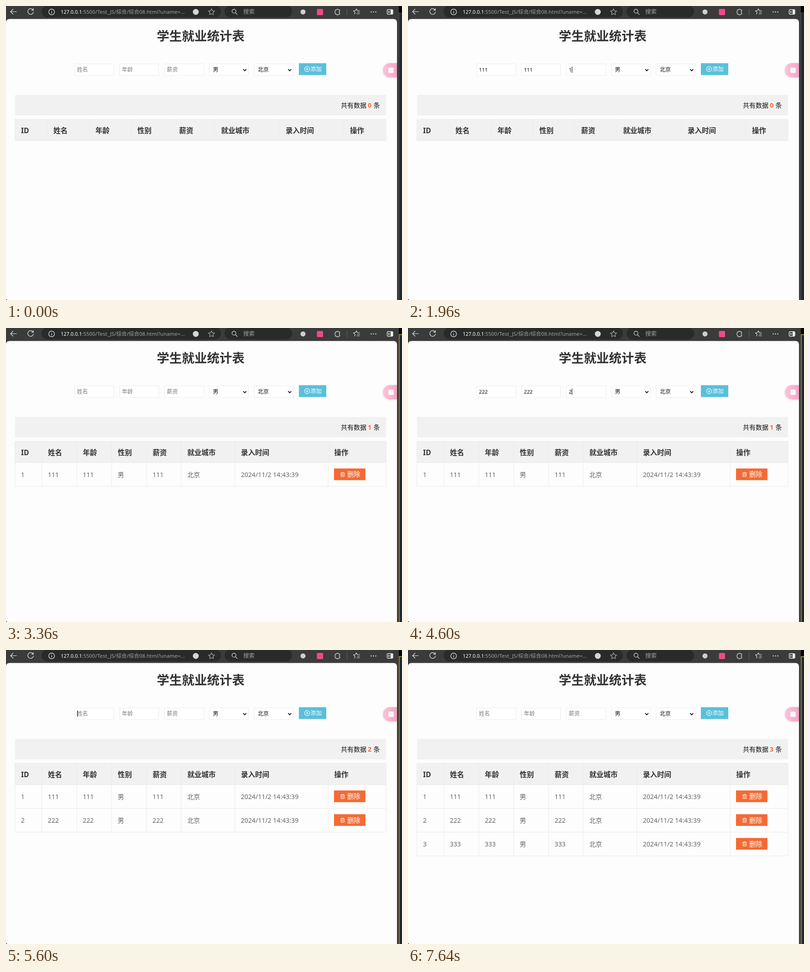
An HTML page that plays this animation: 868x645 px, repeating every 8000 ms.

```html
<!DOCTYPE html>
<html lang="zh-CN">
<head>
<meta charset="utf-8">
<title>学生就业统计表</title>
<style>
  html, body { margin: 0; width: 100%; height: 100%; overflow: hidden; background: #3b3b3b; }
  svg { display: block; width: 868px; height: 645px; }
  text { font-family: 'Noto Sans', 'Noto Sans CJK SC', sans-serif; white-space: pre; }
  .icon { fill: none; stroke: #e6e6e6; stroke-width: 1.2; stroke-linecap: round; stroke-linejoin: round; }
  .tab { filter: drop-shadow(0 1px 2px rgba(0, 0, 0, .14)); }
</style>
</head>
<body>
<svg viewBox="0 0 868 645">
  <defs>
    <linearGradient id="pink" x2="1"><stop stop-color="#fbc3d9"/><stop offset="1" stop-color="#f5a2c6"/></linearGradient>
    <clipPath id="sheet"><path d="M0 0H857V645H0Z"/></clipPath>
  </defs>
  <g id="chrome"></g>
  <g id="page"></g>
</svg>
<script>
const LOOP = 8000;
const FIELDS = [150.5, 249, 347.5];
const HINTS = ['姓名', '年龄', '薪资'];
const HEADS = ['ID', '姓名', '年龄', '性别', '薪资', '就业城市', '录入时间', '操作'];
const EMPTY_COLS = [19.5, 90.5, 182.5, 274.5, 366, 458, 599.5, 740.5, 833];
const FULL_COLS = [19.5, 78.5, 155, 231.5, 308, 384, 501.5, 706, 833];
const ROW_H = 52.1;
const DIGIT = 6.4;

// f: focus next field, k: key, h: hover on, b: blur, s: submit, o: hover off, g: gold edge
const STEPS = [
  ['fkkkfkkkfkkkhbso', [320, 480, 680, 760, 920, 1080, 1280, 1400, 1840, 1960, 2160, 2240, 2360, 2680, 2760, 3000]],
  ['gfkkkfkkkfkkkhbso', [3360, 3480, 3600, 3720, 3800, 3920, 4040, 4200, 4320, 4440, 4600, 4760, 4840, 4920, 5080, 5120, 5200]],
  ['fkkkfkkkfkkkhbso', [5600, 5760, 5920, 6040, 6120, 6240, 6360, 6440, 6560, 6720, 6840, 6960, 7080, 7200, 7280, 7400]]
].flatMap(([acts, times]) => times.map((at, i) => ({ at, act: acts[i] })));

const text = (x, y, s, size, fill, weight = 400) =>
  `<text x="${x}" y="${y}" font-size="${size}" fill="${fill}" font-weight="${weight}">${s}</text>`;
const rect = (x, y, w, h, fill, extra = '') =>
  `<rect x="${x}" y="${y}" width="${w}" height="${h}" fill="${fill}" ${extra}/>`;
const line = (d, color, width = 1) =>
  `<path d="${d}" fill="none" stroke="${color}" stroke-width="${width}"/>`;
const icon = (d, extra = '') => `<path class="icon" d="${d}" ${extra}/>`;
const dot = (x, y, r, fill) => `<circle cx="${x}" cy="${y}" r="${r}" fill="${fill}"/>`;

function star(cx, cy, r) {
  const pts = Array.from({ length: 10 }, (_, i) => {
    const a = i * Math.PI / 5 - Math.PI / 2, q = i % 2 ? r * .48 : r;
    return (cx + q * Math.cos(a)).toFixed(1) + ' ' + (cy + q * Math.sin(a)).toFixed(1);
  });
  return 'M' + pts.join('L') + 'Z';
}

function chrome() {
  return rect(0, 0, 868, 645, '#3b3b3b')
    + rect(861, 0, 7, 14, '#050505') + rect(861, 14, 7, 631, '#202a33')
    + rect(78, -1, 393, 26, '#2a2a2a', 'rx="13"')
    + rect(479, -1, 148, 26, '#2a2a2a', 'rx="13"')
    + icon('M23 12.5H10M15.5 7L10 12.5L15.5 18')
    + icon('M59.6 9A6.3 6.3 0 1 0 60.3 13M60 5.5V9.3H56.2')
    + icon('M106.3 13A6.3 6.3 0 1 1 93.7 13A6.3 6.3 0 1 1 106.3 13M100 12.3V16M100 9.8V9.9')
    + text(120, 17, '127.0.0.1', 11, '#fff')
    + text(166.3, 17, ':5500/Test_JS/综合/综合08.html?uname=...', 11.5, '#a3a3a3')
    + dot(416, 13, 6.5, '#d6d6d6')
    + icon(star(450.5, 13.2, 7.2), 'style="stroke:#aaa"')
    + icon('M504 11.4A4.3 4.3 0 1 1 495.4 11.4A4.3 4.3 0 1 1 504 11.4M502.8 14.6L507 18.6')
    + text(520, 17, '搜索', 12.5, '#a0a0a0')
    + dot(651, 13, 5.5, '#cfcfcf')
    + rect(681.5, 6.5, 13.5, 13.5, '#ea4c89', 'rx="2"')
    + icon('M722 8.5H724.5A2.2 2.2 0 0 1 728.7 8.5H731.5V11.3A2 2 0 0 0 731.5 15V18H728.7A2.2 2.2 0 0 1 724.5 18H722V15.2A2.2 2.2 0 0 1 722 11.2Z')
    + line('M747.5 6V20', '#666')
    + icon('M764 17.8L765 13.6L761.5 10.5L766 10L768 6.2L770 10H775M770.5 13.5H775M769 17H775')
    + [800.5, 805.5, 810.5].map(x => dot(x, 13, 1.2, '#e6e6e6')).join('')
    + rect(835.5, 8, 12.5, 10, 'none', 'rx="2" stroke="#eee" stroke-width="1.3"')
    + rect(843, 8, 5, 10, '#eee', 'rx="1"') + icon('M842 13H838M839.5 11.5L838 13L839.5 14.5')
    + '<path d="M0 645V36.6Q0 28.6 8 28.6H849Q857 28.6 857 36.6V645H3Q1 645 0 642Z" fill="#fdfdfd"/>'
    + text(330.5, 76.3, '学生就业统计表', 27.5, '#333', 700)
    + select(445.5, '男') + select(544, '北京')
    + rect(20, 195, 813, 45, '#f2f1f1')
    + text(734, 222.6, '共有数据', 14, '#111') + text(805.5, 222.6, '条', 14, '#111')
    + '<g clip-path="url(#sheet)"><path class="tab" d="M860 125.2H842A15.7 15.7 0 0 0 842 156.6H860Z" fill="url(#pink)"/></g>'
    + rect(838, 135, 12, 12, '#fff', 'rx="2" opacity=".85"');
}

function box(x) {
  return rect(x, 127, 85.5, 25.5, '#fff', 'stroke="#ececec"');
}

function select(x, label) {
  return box(x) + text(x + 8, 143.8, label, 12, '#111')
    + line(`M${x + 74.5} 138.7l3.4 3.5l3.4 -3.5`, '#111', 1.7);
}

function stateAt(t) {
  const s = { vals: ['', '', ''], focus: -1, caret: false, hover: false, rows: 0, gold: false };
  for (const { at, act } of STEPS) {
    if (at > t) break;
    if (act === 'f') { s.focus++; s.caret = true; }
    if (act === 'k') s.vals[s.focus] += s.rows + 1;
    if (act === 'h') s.hover = true;
    if (act === 'b') s.caret = false;
    if (act === 's') { s.vals = ['', '', '']; s.focus = -1; s.rows++; }
    if (act === 'o') s.hover = false;
    if (act === 'g') s.gold = true;
  }
  return s;
}

function form(s) {
  const inputs = FIELDS.map((x, i) => {
    const v = s.vals[i];
    const caret = s.caret && s.focus === i
      ? rect(Math.round(x + 5 + DIGIT * v.length), 133, 1, 13.5, '#000') : '';
    return box(x) + (v ? text(x + 5, 143.5, v, 11.2, '#111') : text(x + 5, 143.8, HINTS[i], 12, '#7b7b7b')) + caret;
  }).join('');
  return inputs + rect(642, 125.5, 60, 26, s.hover ? '#50a9c0' : '#5bbfda')
    + '<circle cx="660" cy="138.5" r="5.6" fill="none" stroke="#fff" stroke-width="1.1"/>'
    + line('M657 138.5H663M660 135.5V141.5', '#fff', 1.1)
    + text(667, 143.2, '添加', 12.4, '#fff');
}

function deleteButton(y) {
  return rect(719, y, 68.8, 25.6, '#f46a34')
    + line(`M733 ${y + 10}h9.6M736 ${y + 10}v-1.7h3.6v1.7M734.2 ${y + 10}v7.7h7.2v-7.7M736.6 ${y + 12}v4M739 ${y + 12}v4`, '#fff', 1)
    + text(748, y + 18.2, '删除', 14.3, '#fff');
}

function table(rows) {
  const cols = rows ? FULL_COLS : EMPTY_COLS;
  const bottom = 295.5 + rows * ROW_H;
  const edge = rows ? '#eaeaea' : '#ececec';
  let out = rect(19.5, 248.5, 813.5, 47, '#f2f1f1');
  out += cols.map(x => line(`M${x} 248.5V${bottom}`, edge)).join('');
  out += line('M19.5 248.5H833M19.5 295.5H833', edge);
  out += HEADS.map((h, i) => text(cols[i] + 13.5, 278.5, h, 15.5, '#333', 700)).join('');
  for (let r = 0; r < rows; r++) {
    const y = 295.5 + r * ROW_H, n = String(r + 1).repeat(3);
    const cells = [r + 1, n, n, '男', n, '北京', '2024/11/2 14:43:39'];
    out += line(`M19.5 ${y + ROW_H}H833`, edge);
    out += cells.map((c, i) => text(cols[i] + 13.2, y + 31.2, c, 14.1, '#666')).join('');
    out += deleteButton(y + 12.7);
  }
  return out;
}

function page(s) {
  return form(s)
    + text(793, 222.6, s.rows, 14.2, '#f46a34', 700)
    + table(s.rows)
    + (s.gold ? line('M868 14.5H862V645', '#a08732', 1.8) : line('M861.5 14V645', '#4a525a'));
}

const view = document.getElementById('page');
document.getElementById('chrome').innerHTML = chrome();

let shown = -1;
function frame() {
  const t = performance.now() % LOOP;
  const step = STEPS.filter(e => e.at <= t).length;
  if (step !== shown) {
    view.innerHTML = page(stateAt(t));
    shown = step;
  }
  requestAnimationFrame(frame);
}
frame();
</script>
</body>
</html>
```
